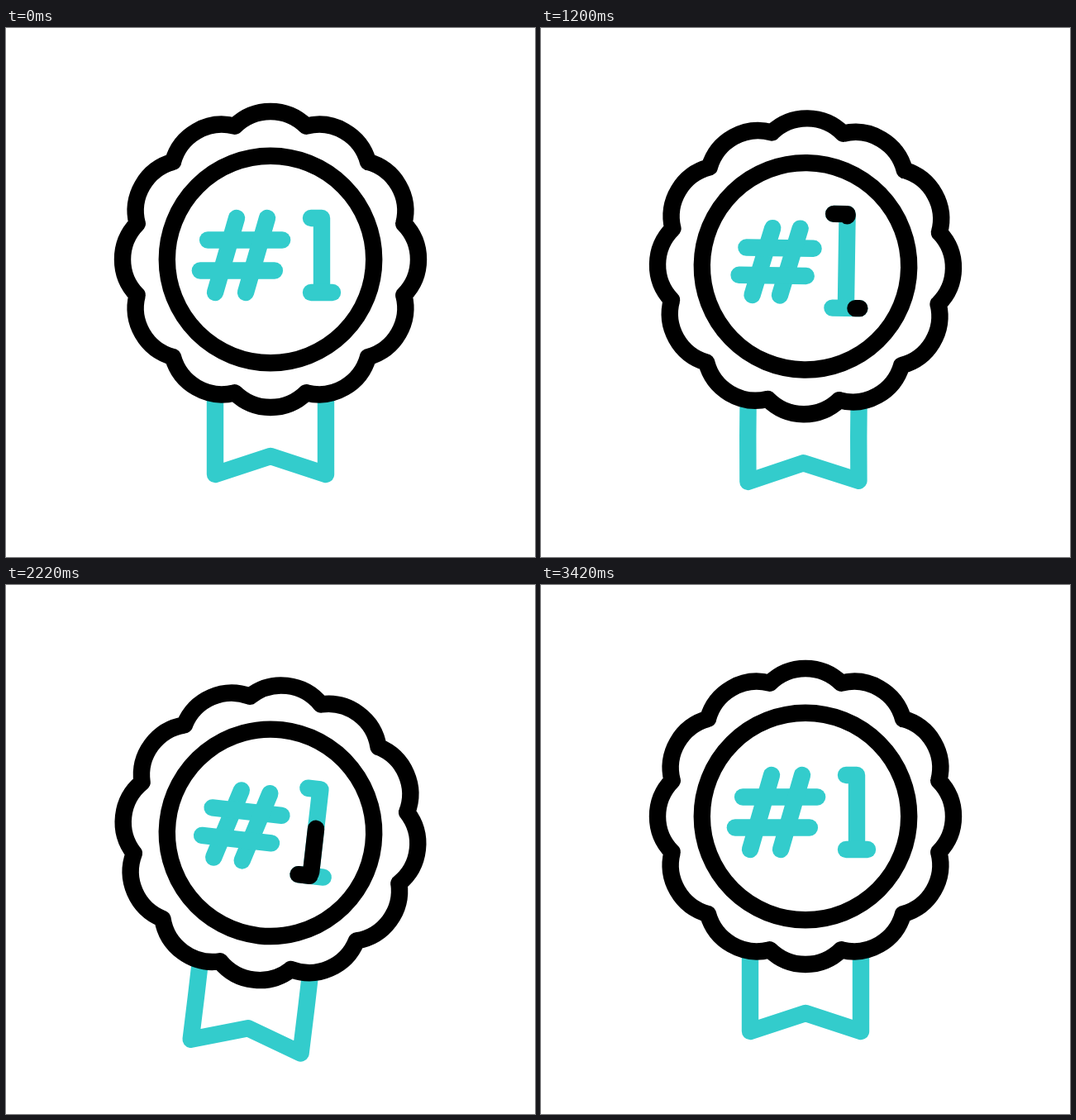
Animation of 640x640 px, one loop 3600 ms. Source, as an HTML page with a canvas:

```html
<!DOCTYPE html>
<html lang="en">
<head>
<meta charset="utf-8">
<title>Number one rosette</title>
<style>
  html, body { margin: 0; width: 100%; height: 100%; overflow: hidden; background: #fff; }
  canvas { display: block; width: 640px; height: 640px; }
</style>
</head>
<body>
<canvas id="stage" width="640" height="640"></canvas>
<script>
const ctx = document.getElementById('stage').getContext('2d');
const LOOP = 3600, TEAL = '#33cccc', BLACK = '#000';
const RAD = Math.PI / 180;

// Eased progress from 0 to 1 between two times.
function ease(t, start, end) {
  const u = Math.min(1, Math.max(0, (t - start) / (end - start)));
  return (1 - Math.cos(Math.PI * u)) / 2;
}

// From rest to a, three half-swings a-b-a-b, and back to rest.
function sway(t, { start, first, last, end }, a, b) {
  if (t < first) return a * ease(t, start, first);
  if (t > last) return b * (1 - ease(t, last, end));
  const phase = 3 * Math.PI * (t - first) / (last - first);
  return (a + b) / 2 + (a - b) / 2 * Math.cos(phase);
}

const BOUNCE = { start: 480, first: 985, last: 2805, end: 3240 };
const SWING = { start: 200, first: 930, last: 2690, end: 3400 };

// Strokes the part of a polyline between two fractions of its length.
function line(points, color, from = 0, to = 1) {
  if (to <= from) return;
  let length = 0;
  ctx.beginPath();
  points.forEach(([x, y], i) => {
    ctx.lineTo(x, y);
    if (i) length += Math.hypot(x - points[i - 1][0], y - points[i - 1][1]);
  });
  if (from > 0 || to < 1) {
    ctx.setLineDash([length * (to - from), length * 2]);
    ctx.lineDashOffset = -length * from;
  }
  ctx.strokeStyle = color;
  ctx.stroke();
  ctx.setLineDash([]);
}

// The ribbon is rigid at the top and arcs sideways by `bend` at its foot.
function ribbon(bend) {
  const top = 150, foot = 260, half = 67;
  const tilt = half * 2 * bend / (foot - top);
  ctx.beginPath();
  ctx.moveTo(-half, top);
  ctx.quadraticCurveTo(-half, (top + foot) / 2, bend - half, foot + tilt);
  ctx.lineTo(bend * 0.6, 238);
  ctx.lineTo(bend + half, foot - tilt);
  ctx.quadraticCurveTo(half, (top + foot) / 2, half, top);
  ctx.strokeStyle = TEAL;
  ctx.stroke();
}

function rosette() {
  const reach = 117.5, radius = 61.5;
  const half = Math.asin(167 * Math.sin(15 * RAD) / radius);
  ctx.beginPath();
  for (let i = 0; i < 12; i++) {
    const a = i * 30 * RAD;
    ctx.arc(reach * Math.cos(a), reach * Math.sin(a), radius, a - half, a + half);
  }
  ctx.closePath();
  ctx.fillStyle = '#fff';
  ctx.fill();
  ctx.strokeStyle = BLACK;
  ctx.stroke();
  ctx.beginPath();
  ctx.arc(0, 0, 125.2, 0, 2 * Math.PI);
  ctx.stroke();
}

function hash(cx, cy, scale) {
  const gap = 18.5 * scale, reach = 45 * scale, slant = 13 * scale;
  for (const side of [-1, 1]) {
    const x = cx + side * gap, y = cy + side * gap, shift = cx - side * gap / 4;
    line([[x + slant, cy - reach], [x - slant, cy + reach]], TEAL);
    line([[shift - reach, y], [shift + reach, y]], TEAL);
  }
}

// A black line runs through the digit, then leaves the same way.
function one(cx, cy, scale, from, to) {
  const w = 13 * scale, h = 45 * scale;
  const stem = [[cx - w, cy - h], [cx, cy - h], [cx, cy + h * 0.92]];
  const base = [[cx + w, cy + h], [cx - w, cy + h]];
  for (const part of [stem, base]) line(part, TEAL);
  for (const part of [stem, base]) line(part, BLACK, from, to);
}

function spark(x, y, angle, length) {
  if (length < 0.1) return;
  const a = angle * RAD;
  line([[x, y], [x + length * Math.cos(a), y + length * Math.sin(a)]], TEAL);
}

function draw(t) {
  ctx.setTransform(1, 0, 0, 1, 0, 0);
  ctx.fillStyle = '#fff';
  ctx.fillRect(0, 0, 640, 640);
  ctx.translate(320, 280 + sway(t, BOUNCE, 20, -21.5));
  ctx.rotate(sway(t, SWING, 8, -8.2) * RAD);
  ctx.lineWidth = 20.4;
  ctx.lineCap = ctx.lineJoin = 'round';

  ribbon(sway(t - 40, SWING, -1, 6));
  rosette();

  // The two signs trade size twice per loop.
  const swap = t > 200 && t < 3400 ? Math.sin(Math.PI * (t - 200) / 1600) ** 2 : 0;
  hash(-35.5, -5, 1 - 0.115 * swap);
  one(62 - 14.5 * swap, -5 - 2.4 * swap, 1 + 0.31 * swap, ease(t, 1800, 2600), ease(t, 1000, 1800));

  const length = 34 * (ease(t, 2540, 2680) - ease(t, 2800, 3240));
  spark(153.5, 166.8, 14.3, length);
  spark(127.7, 193.4, 77.2, length);
}

function frame() {
  draw(performance.now() % LOOP);
  requestAnimationFrame(frame);
}
frame();
</script>
</body>
</html>
```
